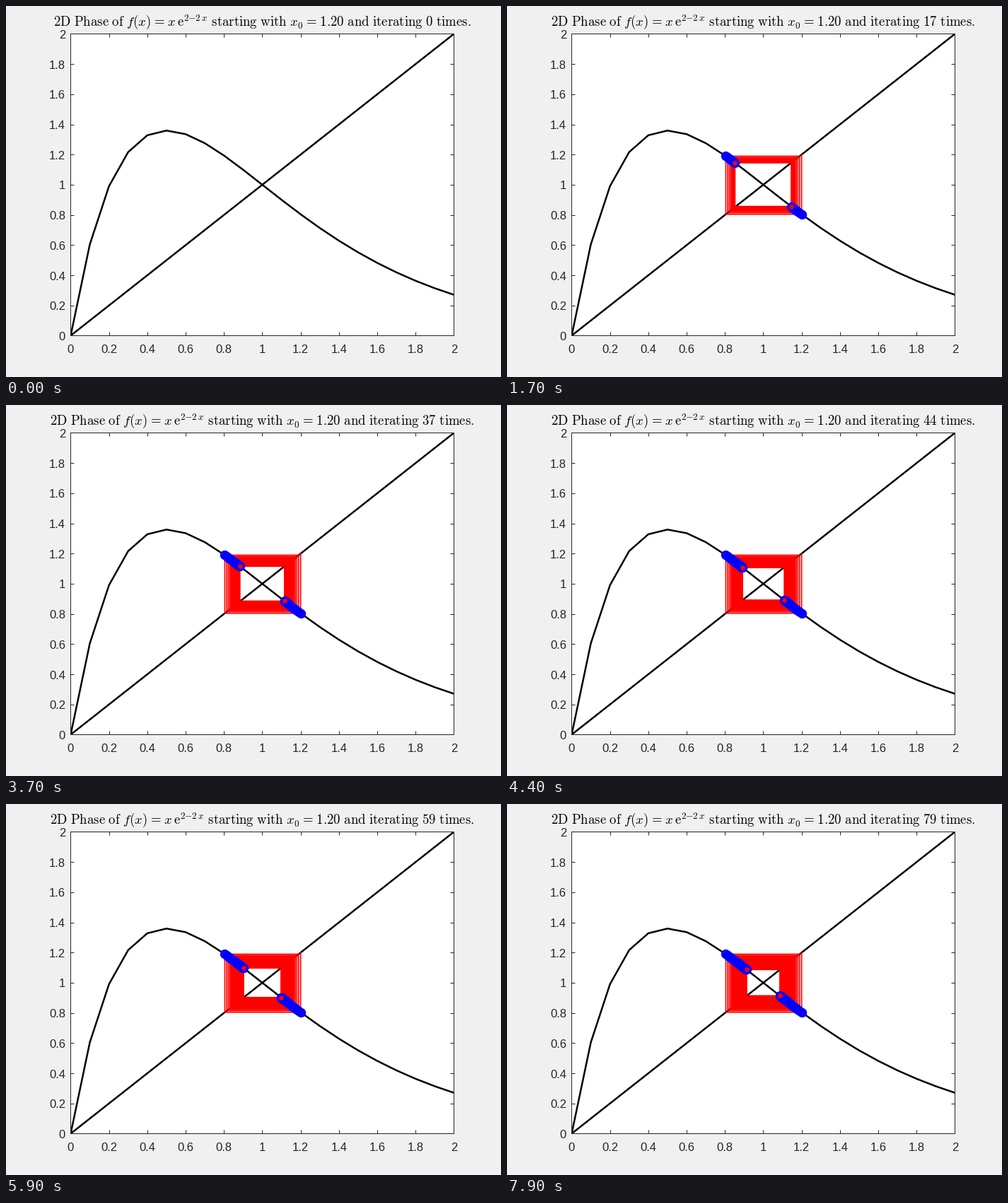
Recreate the animation shown at these times as a matplotlib script. Size 700 by 525 pixels, loop 8 s.

```python
import matplotlib.pyplot as plt
import numpy as np
from matplotlib.animation import FuncAnimation

W, H, DPI = 700, 525, 100
FRAMES, INTERVAL = 80, 100
X0 = 1.2
INK = "#262626"
# Plot box edges in pixels from the top left
LEFT, RIGHT, TOP, BOTTOM = 91.45, 633.45, 39.45, 466.45

plt.rcParams["font.family"] = "Liberation Sans"
plt.rcParams["mathtext.fontset"] = "cm"


def f(x):
    return x * np.exp(2 - 2 * x)


def pt(size):
    """Points on a 120 dpi screen, expressed at the figure's dpi."""
    return size * 120 / DPI


def label(x, y, text, size, **style):
    """Text with its baseline at pixel (x, y), measured from the top left."""
    return fig.text(x / W, 1 - y / H, text, fontsize=pt(size),
                    va="baseline", **style)


def roman(text):
    return r"\mathrm{" + text.replace(" ", r"\ ") + "}"


def title_text(n):
    eq = r"\hspace{0.078}=\hspace{0.078}"
    return ("$" + roman("2D Phase of ")
            + r"f(x)" + eq + r"x\,\mathrm{e}^{2{-}2\,x}"
            + roman(" starting with ")
            + "x_0" + eq + "1.20"
            + roman(f" and iterating {n} times.") + "$")


fig = plt.figure(figsize=(W / DPI, H / DPI), dpi=DPI, facecolor="#f0f0f0")
ax = fig.add_axes([LEFT / W, 1 - BOTTOM / H,
                   (RIGHT - LEFT) / W, (BOTTOM - TOP) / H], facecolor="white")
ax.set(xlim=(0, 2), ylim=(0, 2))

ticks = np.arange(11) / 5
ax.set_xticks(ticks)
ax.set_yticks(ticks)
ax.tick_params(direction="in", length=pt(3.25), width=pt(0.6), color=INK,
               top=True, right=True, labelleft=False, labelbottom=False)
for spine in ax.spines.values():
    spine.set(linewidth=pt(0.6), edgecolor=INK)

for t in ticks:
    px = LEFT + (RIGHT - LEFT) * t / 2
    py = BOTTOM - (BOTTOM - TOP) * t / 2
    label(px, 491, f"{t:g}", 10, ha="center", color=INK)
    label(84, py + 6.5, f"{t:g}", 10, ha="right", color=INK)

title = label((LEFT + RIGHT) / 2, 29, title_text(0), 11.25,
              ha="center", color="black")

grid = np.linspace(0, 2, 21)
ax.plot(grid, f(grid), color="black", lw=pt(1.5))
ax.plot(grid, grid, color="black", lw=pt(1.5))

orbit = [X0]
for _ in range(FRAMES):
    orbit.append(f(orbit[-1]))
orbit = np.array(orbit)

# Cobweb path: (x0, x0), (x0, x1), (x1, x1), (x1, x2), ...
steps = np.repeat(orbit, 2)
web_x = np.append(X0, steps[:-1])
web_y = np.append(X0, steps[1:])

web, = ax.plot([], [], color="red", lw=pt(1), snap=False)
dots, = ax.plot([], [], "o", ms=pt(6), mew=pt(2), mec="blue", mfc="red",
                snap=False)


def update(n):
    end = 2 * n + 2 if n else 0
    web.set_data(web_x[:end], web_y[:end])
    dots.set_data(orbit[:n], orbit[1:n + 1])
    title.set_text(title_text(n))
    return web, dots, title


anim = FuncAnimation(fig, update, frames=FRAMES, interval=INTERVAL,
                     repeat=True, repeat_delay=0, blit=False)
plt.show()
```
